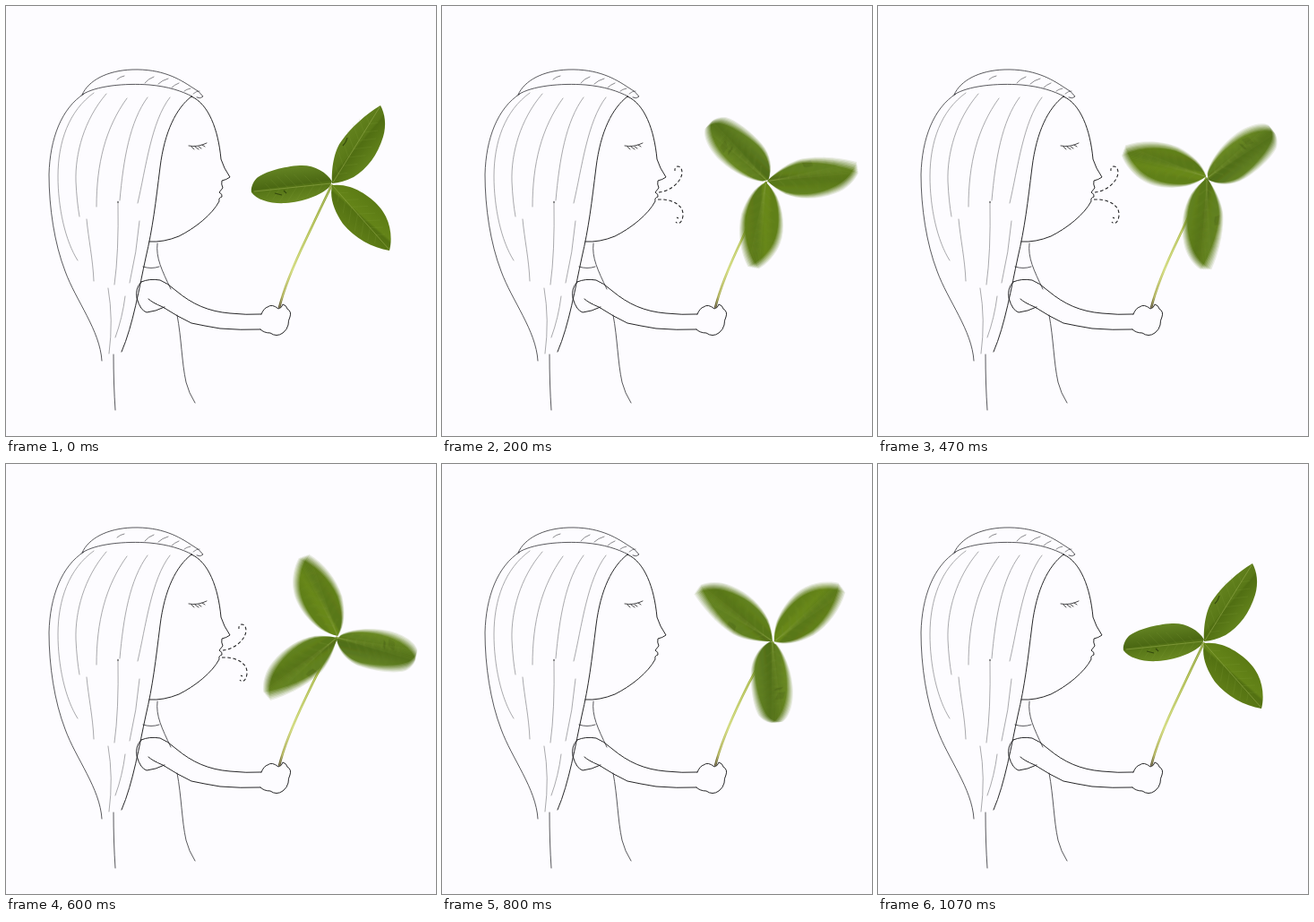
Animation of 480x480 px, one loop 2.07 s. Source, as an HTML page:

```html
<!DOCTYPE html>
<html lang="en">
<head>
<meta charset="utf-8">
<title>Breath and leaf</title>
<style>
  html, body { margin: 0; width: 100%; height: 100%; overflow: hidden; background: #fdfcff; }
  svg { display: block; width: 100%; height: 100%; }
  .line { fill: none; stroke: #1c1c1e; stroke-width: .95; stroke-linecap: round; stroke-linejoin: round; }
  .hair { stroke: #3c3c40; stroke-width: .85; }
  .strand { stroke: #8c8c90; stroke-width: .75; }
  .breath { stroke-width: 1.05; stroke-dasharray: 3.6 2.6; stroke-linecap: butt; }
  .vein { fill: none; stroke: #93a94b; stroke-width: 1; opacity: .6; }
  .rib { fill: none; stroke: #88a040; stroke-width: .7; opacity: .25; }
  #clover { isolation: isolate; }
  #clover use { mix-blend-mode: plus-lighter; }
</style>
</head>
<body>
<svg viewBox="0 0 480 480">
  <defs>
    <linearGradient id="gA" gradientUnits="userSpaceOnUse" x1="378" y1="138" x2="411" y2="166">
      <stop offset="0" stop-color="#65841f"/><stop offset=".5" stop-color="#597817"/>
      <stop offset=".55" stop-color="#506e12"/><stop offset="1" stop-color="#61811b"/>
    </linearGradient>
    <linearGradient id="gB" gradientUnits="userSpaceOnUse" x1="317" y1="179" x2="322" y2="220">
      <stop offset="0" stop-color="#648423"/><stop offset=".5" stop-color="#4b6813"/>
      <stop offset=".56" stop-color="#557416"/><stop offset="1" stop-color="#6b8a23"/>
    </linearGradient>
    <linearGradient id="gC" gradientUnits="userSpaceOnUse" x1="410" y1="216" x2="380" y2="250">
      <stop offset="0" stop-color="#5b7a14"/><stop offset=".47" stop-color="#648418"/>
      <stop offset=".53" stop-color="#537112"/><stop offset="1" stop-color="#617f18"/>
    </linearGradient>
    <linearGradient id="gStem" gradientUnits="userSpaceOnUse" x1="305" y1="336" x2="364" y2="199">
      <stop offset="0" stop-color="#4c4326"/><stop offset=".08" stop-color="#a3a44a"/>
      <stop offset=".3" stop-color="#ccd673"/><stop offset=".7" stop-color="#a3b340"/>
      <stop offset="1" stop-color="#7f9730"/>
    </linearGradient>
    <g id="leaves">
      <path fill="url(#gB)" d="M364 196C358 185 343 177 328 178C310 179 289 185 280 192C275 197 273 204 274 208C280 217 297 221 312 220C331 219 352 211 361 202Z"/>
      <path fill="url(#gC)" d="M364 200C361 214 366 228 376 243C389 259 409 270 428 273C431 262 430 247 424 235C417 220 399 207 384 202Q374 199 364 200Z"/>
      <path fill="url(#gA)" d="M364 198C363 183 366 161 375 150C384 137 401 121 418 111C423 120 425 133 421 146C415 166 403 182 388 191Q376 197 364 198Z"/>
      <g id="veins"></g>
      <path fill="none" stroke="#34490c" stroke-width="1.2" d="M376 156q4-4 5-9M300 209l8 2M310 206l3 3"/>
    </g>
  </defs>

  <g class="line hair">
    <path d="M85 99C92 83 113 72 141 71C174 70 193 81 208 91Q216 95 220 101Q217 104 213 102"/>
    <path d="M85 99C100 89 133 86 160 88C182 90 196 95 208 101"/>
    <path stroke-width=".6" d="M124 82q3-3 8-4M155 86q4-5 10-7M170 87q4-4 11-6M185 91q3-3 8-5M199 95q2-2 7-3M209 98q3-3 7-3"/>
    <path d="M87 98C62 114 49 148 48 188C48 225 54 265 66 296C78 329 105 362 107 396"/>
    <path d="M153 291Q162 294 171 291M169 265C167 281 174 295 184 316"/>
    <path d="M120 389Q120 422 122 451M191 345C196 371 196 397 201 420Q204 432 211 443"/>
  </g>

  <g class="line">
    <path d="M207 101C190 114 177 140 172 180C167 220 164 247 156 281C149 313 142 356 129 386"/>
    <path d="M207 101C226 109 237 138 240 171Q243 181 250 191Q246 194 241 195Q240 199 242 203L238 208Q242 210 241 213Q237 214 238 218C230 233 211 248 193 257Q176 264 160 263"/>
    <path stroke-width=".8" d="M204 156Q214 158 224 153M207 157l3 3M211 157l4 3M215 157l3 2M219 155l3 2"/>
    <path d="M151 308Q160 304 172 306Q180 309 190 318C208 333 226 341 250 343Q268 345 285 344"/>
    <path d="M151 308Q144 315 146 326Q150 340 157 342Q167 341 177 336"/>
    <path d="M159 327Q163 331 175 336Q192 347 207 354Q221 357 239 360Q262 362 284 361"/>
    <path d="M285 344Q288 337 292 336Q297 332 304 338Q308 337 309 333Q313 334 314 338Q319 341 317 347Q315 351 315 356Q314 361 309 365Q302 370 295 365Q288 365 284 361"/>
  </g>

  <g class="line strand">
    <path d="M98 97C70 117 58 152 58 190C58 225 66 262 80 284"/>
    <path d="M112 98C87 127 77 165 78 196Q79 218 82 235"/>
    <path d="M135 103C111 136 101 176 101 224"/>
    <path d="M158 102C138 129 131 172 127 217"/>
    <path d="M183 102C162 129 156 182 147 220"/>
    <path d="M90 238C92 260 97 282 98 307"/>
    <path d="M125 218Q126 276 121 311"/>
    <path d="M149 240Q146 275 138 309"/>
    <path d="M114 315Q120 350 115 388M133 324Q130 348 122 370"/>
  </g>
  <circle cx="125" cy="219" r=".8" fill="#333"/>

  <g id="breath" class="line breath">
    <path d="M242 208C253 207 267 198 268 186C268 177 259 177 260 184"/>
    <path d="M241 216C256 215 270 222 269 234C268 243 263 244 261 241M262 236l2 1"/>
  </g>

  <path id="stem" fill="none" stroke="url(#gStem)" stroke-width="2.6"/>
  <path id="shine" fill="none" stroke="#f0f3bc" stroke-width=".8" opacity=".5"/>
  <g id="clover"></g>
</svg>
<script>
const LOOP = 2070, STEP = 200 / 3, LAST = 16;
const SPEED = 24.8;                       // degrees per step at full speed
const HUB = { x: 366.5, y: 195.5 };
const JOINT = { x: -2.5, y: 3.5 };        // where the leaves meet, from the hub
const COPIES = 8, BLUR = 7;               // spin blur: samples and arc in degrees
const NS = 'http://www.w3.org/2000/svg';
const el = id => document.getElementById(id);

function add(parent, tag, attrs) {
  const node = document.createElementNS(NS, tag);
  for (const k in attrs) node.setAttribute(k, attrs[k]);
  return parent.appendChild(node);
}

function addVeins(x0, y0, x1, y1, half) {
  const dx = x1 - x0, dy = y1 - y0, len = Math.hypot(dx, dy);
  const ux = dx / len, uy = dy / len;
  let ribs = '';
  for (let i = 1; i < 8; i++) {
    const u = i / 9, w = half * Math.sin(Math.PI * (u + .06)) * .8;
    for (const side of [-1, 1]) {
      ribs += `M${x0 + dx * u} ${y0 + dy * u}l${ux * w * .8 - uy * w * side} ${uy * w * .8 + ux * w * side}`;
    }
  }
  add(el('veins'), 'path', { class: 'rib', d: ribs });
  add(el('veins'), 'path', { class: 'vein', d: `M${x0} ${y0}L${x1} ${y1}` });
}

addVeins(365, 197, 417, 113, 20);
addVeins(363, 198, 277, 207, 19);
addVeins(365, 201, 427, 271, 19);

// Added together, the faint copies form an even average.
const copies = Array.from({ length: COPIES }, () =>
  add(el('clover'), 'use', { href: '#leaves' }));

function spin(n) {
  if (n < 2) return SPEED / 4 * n * n;
  return Math.min(SPEED * (n - 1), 360);
}

function breathAlpha(n) {
  if (n < 1) return 0;
  return Math.min(1, n / 2, Math.max(0, (12 - n) / 3));
}

function draw(t) {
  const n = Math.min(LAST, Math.floor((t + 4) / STEP));
  const angle = spin(n);
  const moving = n > 0 && n < LAST;
  const arc = moving ? BLUR * Math.min(1, n / 2) : 0;
  copies.forEach((copy, i) => {
    const a = angle + arc * (i / (COPIES - 1) - .5);
    copy.setAttribute('transform', `rotate(${a} ${HUB.x} ${HUB.y})`);
    copy.setAttribute('opacity', moving ? 1 / COPIES : 1);
    copy.style.display = moving || i === 0 ? '' : 'none';
  });

  const r = angle * Math.PI / 180, c = Math.cos(r), s = Math.sin(r);
  const x = HUB.x + JOINT.x * c - JOINT.y * s;
  const y = HUB.y + JOINT.x * s + JOINT.y * c;
  const d = `M305 337Q312 308 335 260Q350 228 ${x} ${y}`;
  el('stem').setAttribute('d', d);
  el('shine').setAttribute('d', d);
  el('breath').setAttribute('opacity', breathAlpha(n));
}

const start = performance.now();
function tick() {
  draw((performance.now() - start) % LOOP);
  requestAnimationFrame(tick);
}
tick();
</script>
</body>
</html>
```
